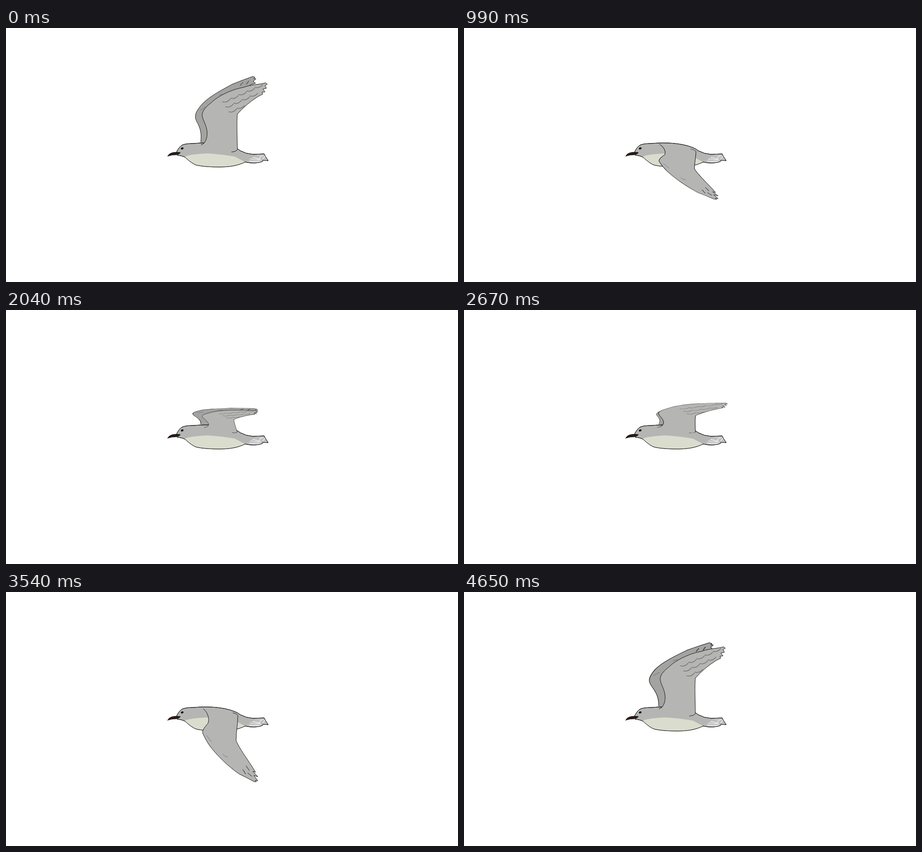
Animation, 998 px wide and 561 px high, one loop 4680 ms. Source, as an HTML page:

```html
<!DOCTYPE html>
<html lang="en">
<head>
<meta charset="utf-8">
<title>Flying gull</title>
<style>
  html, body { margin: 0; width: 100%; height: 100%; overflow: hidden; background: #fff; }
  svg { display: block; width: 100vw; height: 100vh; fill: none; stroke: #111; stroke-linejoin: round; stroke-linecap: round; }
  .grey { fill: #b5b5b3; }
  .far { fill: #a3a3a1; }
  .belly { fill: #dadccd; stroke: none; }
  .tail { fill: #bfbfc0; stroke: none; }
  .beak { fill: #2d1b14; }
  .feather { stroke: #747474; stroke-width: 1.5; }
  .thin { stroke: #666; stroke-width: .8; }
  .white { stroke: #f4f4f4; stroke-width: 1.3; }
</style>
</head>
<body>
<svg viewBox="0 0 998 561">
  <defs>
    <path id="hull" d="M376 275Q382 262 390 258Q398 255 415 255C445 252 480 254 505 264Q513 267 517 271Q530 278 545 279L570 278 573 284 579 293 567 292 566 295Q549 301 528 296C510 305 490 307 470 307Q440 307 421 303Q411 300 396 286Q390 282 378 281"/>
  </defs>

  <g id="far">
    <path class="far" d="M430 252C432 235 430 225 424 212C416 198 414 190 433 168C450 150 480 135 500 124Q522 115 545 107L550 109 547 112 552 112 546 118 551 122 541 125 470 172 455 240 436 256"/>
    <path class="thin" d="M428 182L440 175M470 149Q476 145 481 147"/>
    <path d="M517 127L523 120M531 124L536 117"/>
  </g>

  <g id="body">
    <use href="#hull" class="grey"/>
    <path class="belly" d="M394 285Q402 279 445 277Q478 279 505 284L528 296C510 305 490 307 470 307Q440 307 421 303Q411 300 394 285"/>
    <path class="tail" d="M530 295L549 281 570 279 578 292 566 295Q549 300 530 295"/>
    <path class="white" d="M540 289Q550 293 562 290M545 286L558 289M538 294Q550 297 562 294M560 290Q559 283 567 282M567 289L572 283"/>
    <use href="#hull"/>
    <path class="beak" d="M357 283Q362 272 385 275Q383 279 376 280Q366 280 357 283Z"/>
    <ellipse cx="389" cy="266" rx="3" ry="2.2" transform="rotate(-20 389 266)" fill="#111" stroke="none"/>
  </g>

  <g id="near">
    <path class="grey" d="M431 258C440 256 445 243 444 230C443 215 435 205 433 193C433 180 447 170 453 165C468 150 500 135 525 131C540 125 560 125 573 121L577 124 572 127 575 133 567 135 572 141 565 142 567 146 557 151Q530 168 511 190Q509 200 511 268Q509 273 498 274"/>
    <path class="feather" id="feathers"/>
  </g>

  <g id="down">
    <path class="grey" d="M436 258C445 265 450 280 446 290C440 297 434 303 434 311C438 320 443 330 450 340C465 360 490 385 515 402Q532 410 548 419L553 419 550 416 556 417 547 405 556 408 545 396 551 398 543 385C530 365 515 345 508 328C508 310 512 290 512 273Q509 268 501 267"/>
    <path class="thin" d="M443 317L454 331M479 358Q483 364 489 364"/>
    <path d="M530 384l7 10M523 392l6 10M534 400l9 7"/>
  </g>
</svg>
<script>
const STEP = 30, LOOP = 4680, PEAK = 2370, DOWN = 1170;
const $ = id => document.getElementById(id);

// Overlapping rows of feathers, shorter towards the trailing edge.
$('feathers').setAttribute('d', [5, 4, 2].map((count, row) =>
  Array.from({ length: count }, (_, col) =>
    `M${478 + 18 * col + 7 * row} ${163 - 8 * col + 11 * row}q9 3 17 -6`).join('')).join(''));

// Each wing hangs on a fixed root. Elbow and tip (x, y, x, y) go from flat to full;
// sway bows their path, and back shifts them on the downstroke.
const still = [0, 0, 0, 0];
const wings = {
  far: { root: [430, 252], art: [418, 188, 547, 107], flat: [421, 250, 553, 275],
         full: [408, 190, 544, 112], sway: [6, 4, 0, 5], back: [10, -2, 3, -5] },
  near: { root: [511, 271], art: [433, 188, 576, 122], flat: [430, 256, 562, 271],
          full: [433, 188, 576, 122], sway: [-2, 0, 13, 0], back: still },
  down: { root: [512, 271], art: [434, 308, 553, 419], flat: [422, 253, 570, 278],
          full: [434, 308, 553, 419], sway: still, back: still }
};

// Lift runs from 1 (raised) through 0 (edge on) to -1 (lowered) and back.
function flap(t) {
  const time = t % PEAK;
  const upTime = (t < PEAK ? PEAK : LOOP - STEP - PEAK) - DOWN;
  const falling = time < DOWN;
  const lift = falling
    ? 1 - 2 * (time / DOWN) ** .93
    : 2 * Math.min(1, (time - DOWN) / upTime) ** 1.28 - 1;
  return { lift, falling };
}

// Affine map that keeps the root and carries the drawn elbow and tip to the pose.
function wingMatrix({ root: [x, y], art, flat, full, sway, back }, { lift, falling }) {
  const s = Math.abs(lift), bow = 4 * s * (1 - s) * (falling ? 1 : -1);
  const pose = flat.map((v, i) =>
    v + (full[i] - v) * s + sway[i] * bow + (falling ? back[i] * s : 0));
  const local = p => p.map((v, i) => v - (i % 2 ? y : x));
  const [ex, ey, tx, ty] = local(art);
  const [px, py, qx, qy] = local(pose);
  const det = ex * ty - tx * ey;
  const a = (px * ty - qx * ey) / det, c = (qx * ex - px * tx) / det;
  const b = (py * ty - qy * ey) / det, d = (qy * ex - py * tx) / det;
  return new DOMMatrix([a, b, c, d, x - a * x - c * y, y - b * x - d * y]);
}

function draw() {
  const stroke = flap(Math.floor((performance.now() - start) % LOOP / STEP) * STEP);
  for (const [id, wing] of Object.entries(wings)) {
    const shown = (id === 'down') === (stroke.lift < 0);
    $(id).setAttribute('display', shown ? 'inline' : 'none');
    $(id).setAttribute('transform', wingMatrix(wing, stroke));
  }
  requestAnimationFrame(draw);
}

const start = performance.now();
draw();
</script>
</body>
</html>
```
